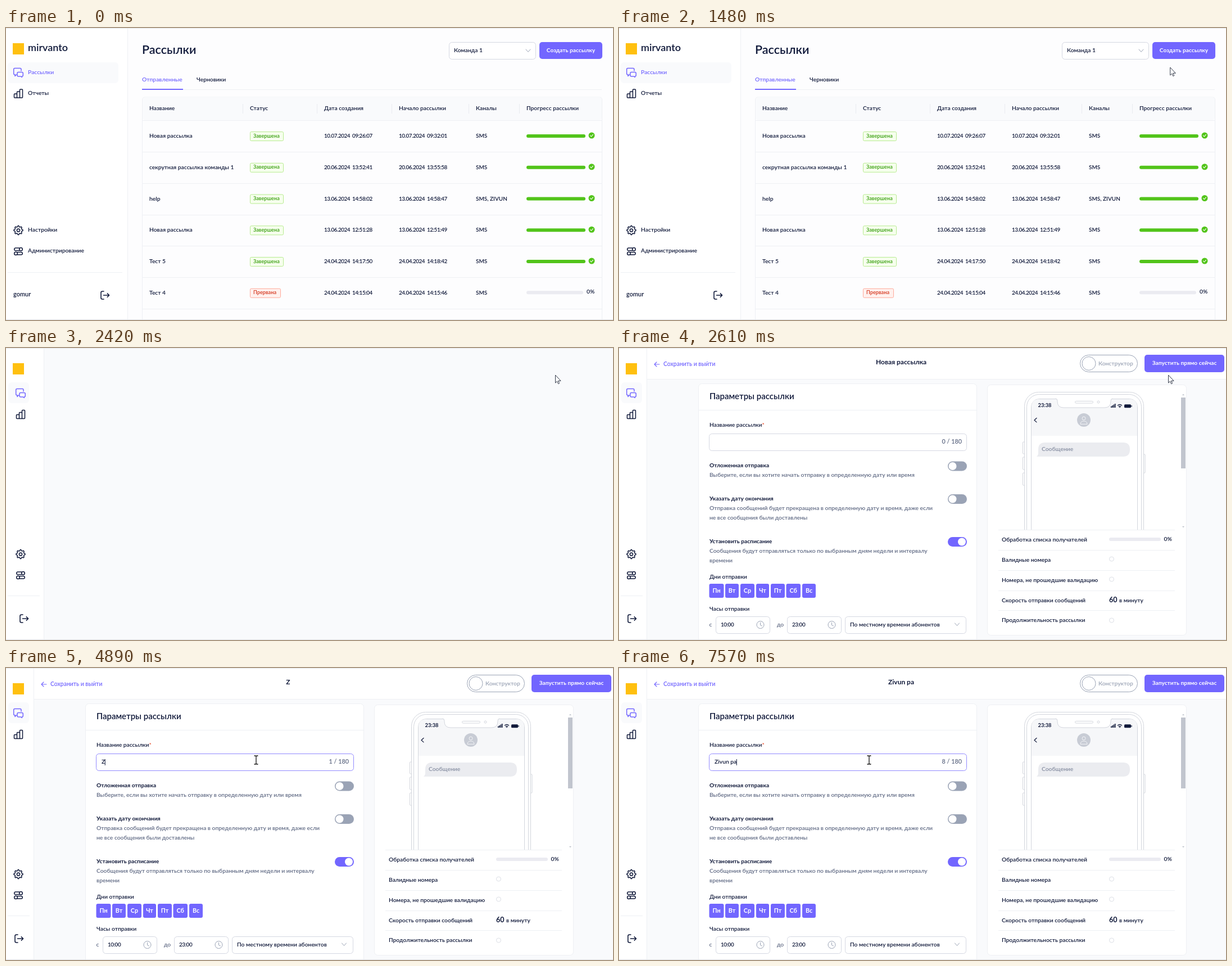
An HTML page for the animation above (8 s loop, 1080 px wide and 519 px high).

```html
<!DOCTYPE html>
<html lang="ru">
<head>
<meta charset="utf-8">
<title>Рассылки</title>
<style>
  html, body { margin: 0; width: 100%; height: 100%; overflow: hidden; background: #fff; }
  svg { display: block; width: 100%; height: 100%; }
  text { font-family: Lato, "Noto Sans", sans-serif; white-space: pre; }
</style>
</head>
<body>
<svg id="stage" viewBox="0 0 1080 519"></svg>
<script>
const LOOP = 8000;
const INK = '#10193a', GRAY = '#606a84', MUTED = '#9aa3b5', LINE = '#eef0f4', EDGE = '#d5d8e2';
const PURPLE = '#7266ff', HOVER = '#928aff', PALE = '#f9fafc', GREEN = '#52c41a', YELLOW = '#ffc010';

const text = (x, y, s, { size = 10.3, weight = 600, fill = INK, anchor = 'start', gap = 0, words = 0, id = '' } = {}) =>
  `<text id="${id}" x="${x}" y="${y}" font-size="${size}" font-weight="${weight}" fill="${fill}" text-anchor="${anchor}" letter-spacing="${gap}" word-spacing="${words}">${s}</text>`;
const rect = (x, y, w, h, fill, r = 0, stroke = 'none', extra = '') =>
  `<rect x="${x}" y="${y}" width="${w}" height="${h}" rx="${r}" fill="${fill}" stroke="${stroke}" ${extra}/>`;
const circle = (x, y, r, fill, stroke = 'none', width = 1, extra = '') =>
  `<circle cx="${x}" cy="${y}" r="${r}" fill="${fill}" stroke="${stroke}" stroke-width="${width}" ${extra}/>`;
const path = (d, stroke = INK, width = 1, fill = 'none') =>
  `<path d="${d}" stroke="${stroke}" stroke-width="${width}" fill="${fill}" stroke-linecap="round" stroke-linejoin="round"/>`;
const hline = (x, y, w, fill = LINE) => rect(x, y, w, 1, fill);
const vline = (x, y, h, fill = LINE) => rect(x, y, 1, h, fill);
const at = (x, y, body) => `<g transform="translate(${x} ${y})">${body}</g>`;
const chevron = (x, y) => path(`M${x - 4} ${y - 2}l4 4.5 4-4.5`, MUTED);
const DIGITS = { size: 9.9, gap: -0.45, words: 2 };

// Sidebar icons, each centred on its own origin
const gear = Array.from({ length: 32 }, (_, i) => {
  const r = i % 4 < 2 ? 8 : 6.2, a = (i - 0.5) * Math.PI / 16;
  return `${(r * Math.cos(a)).toFixed(2)} ${(r * Math.sin(a)).toFixed(2)}`;
}).join('L');
const icons = {
  chat: path('M-3.500 4h-.5l-2 2.500v-2.500q-2.300 0-2.300-2v-7.500q0-2 2-2h9.300q2 0 2 2v2.500M0-.5h6.300q2 0 2 2v3.500q0 2-2 2v1.500l-2-1.500h-4.300q-2 0-2-2v-3.500q0-2 2-2z', PURPLE, 1.5),
  bars: path('M-7.500 1.500q0-1 1-1h4v7h-4q-1 0-1-1zM-2.500 7.500v-10q0-1 1-1h3q1 0 1 1v10zM2.500 7.500v-14q0-1 1-1h3q1 0 1 1v13q0 1-1 1z', INK, 1.5),
  gear: path(`M${gear}Z`, INK, 1.5) + circle(0, 0, 2.6, 'none', INK, 1.5),
  sliders: path('M1.500-1.500h-6.500a2.300 2.300 0 0 1 0-4.600h6.500M-1.500 6.100h6.500a2.300 2.300 0 0 0 0-4.600h-6.500', INK, 1.5)
    + circle(4.5, -3.8, 2.8, 'none', INK, 1.5) + circle(-4.5, 3.8, 2.8, 'none', INK, 1.5),
  exit: path('M-2-7h-2.500q-2.500 0-2.500 2.500v9q0 2.500 2.500 2.500h2.500M-2.500 0h10M4.300-3.300l3.300 3.300-3.300 3.300', INK, 1.6)
};

const logo = rect(12, 27, 20, 20, YELLOW);
const button = (x, y, w, h, label, id) =>
  rect(x, y, w, h, PURPLE, 5, 'none', `id="${id}"`) +
  text(x + w / 2, y + h / 2 + 2.7, label, { size: 10.2, weight: 700, fill: '#fff', anchor: 'middle' });

function listScene() {
  const columns = [[255, 'Название'], [434, 'Статус'], [566, 'Дата создания'], [699, 'Начало рассылки'], [836, 'Каналы'], [926, 'Прогресс рассылки']];
  const rows = [
    ['Новая рассылка', '10.07.2024 09:26:07', '10.07.2024 09:32:01', 'SMS'],
    ['секрутная рассылка команды 1', '20.06.2024 13:52:41', '20.06.2024 13:55:58', 'SMS'],
    ['help', '13.06.2024 14:58:02', '13.06.2024 14:58:47', 'SMS, ZIVUN'],
    ['Новая рассылка', '13.06.2024 12:51:28', '13.06.2024 12:51:49', 'SMS'],
    ['Тест 5', '24.04.2024 14:17:50', '24.04.2024 14:18:42', 'SMS'],
    ['Тест 4', '24.04.2024 14:15:04', '24.04.2024 14:15:46', 'SMS']
  ];
  const tag = (y, label, w, fill, edge, ink) =>
    rect(434.5, y - 6.5, w, 16, fill, 2, edge) + text(440, y + 3.6, label, { size: 9.2, fill: ink });
  const row = ([name, created, started, channel], i) => {
    const y = 191 + 55.75 * i, base = y + 4;
    const done = i < 5;
    return hline(242, Math.round(y + 29), 818) + text(255, base, name) +
      text(566, base, created, DIGITS) + text(699, base, started, DIGITS) + text(836, base, channel, { size: 10 }) +
      (done
        ? tag(y, 'Завершена', 59, '#f6ffed', '#b7eb8f', '#389e0d') + rect(926, y - 2, 105, 6, GREEN, 3) +
          circle(1042, y, 5.5, GREEN) + path(`M1039.500 ${y}l1.800 2 3.200-3.600`, '#fff', 1.1)
        : tag(y, 'Прервана', 54, '#fff1ee', '#ffa99b', '#d4351c') + rect(926, y - 2.5, 101, 6, '#ebebf1', 3) +
          text(1033, y + 2.5, '0%'));
  };
  return rect(0, 0, 1080, 519, '#fdfdfe') + rect(0, 0, 216, 519, '#fff') + vline(216, 0, 519) +
    rect(3, 61, 197, 37, PALE, 6) + logo + text(39, 41, 'mirvanto', { size: 18 }) +
    at(22, 79, icons.chat) + text(39, 82, 'Рассылки', { fill: PURPLE }) +
    at(22, 116.5, icons.bars) + text(39, 119, 'Отчеты') +
    at(22, 359.5, icons.gear) + text(39, 362, 'Настройки') +
    at(22, 397, icons.sliders) + text(39, 399, 'Администрирование') +
    hline(3, 434, 204) + text(13, 477, 'gomur', { size: 11 }) + at(176, 475, icons.exit) +
    text(242, 46, 'Рассылки', { size: 21.5 }) +
    rect(788.5, 25.5, 154, 30, '#fff', 5, EDGE) + text(797, 43, 'Команда 1') + chevron(929, 40) +
    rect(949, 25, 112, 30, 'none', 5, PURPLE, 'id="wave"') + button(949, 25, 112, 30, 'Создать рассылку', 'create') +
    hline(242, 109, 818) + rect(242, 108, 73, 2, PURPLE) +
    text(242, 95, 'Отправленные', { fill: PURPLE }) + text(339, 95, 'Черновики') +
    path('M242.500 519v-391q0-5 5-5h808q5 0 5 5v391', LINE) + rect(243, 123, 817, 41, PALE, 5) + hline(242, 164, 818) +
    columns.map(([x, s], i) => text(x, 146, s) + (i ? vline(x - 13, 135, 17, '#e9ebf0') : '')).join('') +
    rows.map(row).join('');
}

function miniSidebar(width, x, exitX) {
  return rect(0, 0, width, 519, '#fff') + vline(width - 1, 0, 519) + rect(4, 61, 37, 37, PALE, 6) + logo +
    at(x, 80, icons.chat) + at(x, 118, icons.bars) + at(x, 366.5, icons.gear) + at(x, 404, icons.sliders) +
    hline(3, 440, width - 11) + at(exitX, 481, icons.exit);
}

function phone() {
  const edge = '#d3d6dd';
  const shell = (x, y, w, r) => rect(x, y, w, 300, '#fff', r, edge);
  const bump = (x, y, h) => rect(x, y, 3.5, h, '#fff', 1, edge);
  return `<clipPath id="cut"><rect x="700" y="70" width="290" height="254"/></clipPath><g clip-path="url(#cut)">` +
    bump(718.5, 167, 21) + bump(718.5, 194, 22) + bump(718.5, 222, 22) + bump(932.5, 189, 33) +
    shell(721.5, 78.5, 212, 25) + shell(725.5, 82.5, 204, 22) + shell(733.5, 90.5, 189, 14) +
    path('M734 156v-51q0-14 14-14h160q14 0 14 14v51z', 'none', 0, '#f6f7f9') +
    path('M777 90q3 0 3 4v1q0 11 11 11h73q11 0 11-11v-1q0-4 3-4', edge, 1, '#fff') +
    rect(811.5, 94.5, 32, 3.5, '#fff', 2, edge) + circle(853, 96, 2, '#fff', edge) +
    text(745.5, 105, '23:38', { size: 9.3, weight: 700 }) +
    [0, 1, 2, 3].map(i => rect(875 + i * 2.3, 103.5 - i * 1.5, 1.6, 2.5 + i * 1.5, INK)).join('') +
    path('M887.500 102q3.500-3 7 0M889.300 104q1.700-1.300 3.400 0', INK, 1.3) + circle(891, 105.3, 0.9, INK) +
    rect(899, 100.2, 12, 6, INK, 1.5) + rect(911.5, 102, 1.2, 2.5, INK) +
    path('M743 124.500l-4 3.700 4 3.700', INK, 1.2) +
    circle(827, 128, 12, '#c8ccd5') + circle(827, 125, 3, 'none', '#f2f3f6') + path('M821 135q0-5 6-5t6 5z', '#f2f3f6') +
    path('M743 193q3-2 3-7v-6q0-12 12-12h139q12 0 12 12v1q0 12-12 12z', 'none', 0, '#ebecf0') +
    text(752, 182.5, 'Сообщение', { fill: '#858da1' }) + '</g>';
}

function formScene() {
  const toggle = (y, on) => rect(585, y - 8.5, 34, 17, on ? PURPLE : MUTED, 8.5) + circle(on ? 610 : 593.5, y, 7, '#fff');
  const option = (y, title, lines) => text(161, y, title, { size: 10.2, weight: 700 }) +
    lines.map((s, i) => text(161, y + 17 + 17 * i, s, { fill: GRAY })).join('');
  const clock = x => circle(x, 492, 6.5, 'none', MUTED) + path(`M${x} 488v4.500l3 1.500`, MUTED);
  const field = (x, w, s, style) => rect(x + .5, 477.5, w, 30, '#fff', 5, EDGE) + text(x + 9, 495, s, style);
  const days = [['Пн', 160.5, 26], ['Вт', 189, 24], ['Ср', 216, 25], ['Чт', 244, 23], ['Пт', 270, 25], ['Сб', 297.5, 25.5], ['Вс', 326, 24]]
    .map(([d, x, w]) => rect(x, 419, w, 25, PURPLE, 3) +
      text(x + w / 2, 435, d, { fill: '#fff', anchor: 'middle', size: 10.8, weight: 700 })).join('');
  const stats = [[344, 'Обработка списка получателей'], [380, 'Валидные номера'], [416, 'Номера, не прошедшие валидацию'], [452, 'Скорость отправки сообщений'], [487, 'Продолжительность рассылки']]
    .map(([y, s]) => hline(675, y - 21, 314) + text(681, y, s)).join('');
  return rect(0, 0, 1080, 519, PALE) + rect(50, 0, 1030, 55, '#fff') + hline(50, 55, 1030) + miniSidebar(50, 22, 23) +
    path('M63 29h9M67 25l-4 4 4 4', PURPLE, 1.1) + text(79, 32, 'Сохранить и выйти', { fill: PURPLE, size: 10.4 }) +
    text(502, 29, '', { size: 12, weight: 700, anchor: 'middle', id: 'title' }) +
    rect(820.5, 12.5, 102, 30, '#fff', 15, MUTED) + circle(836, 27.5, 12, '#fff', MUTED) +
    text(853, 30.5, 'Конструктор', { fill: MUTED }) +
    button(935, 12, 142, 31, 'Запустить прямо сейчас', 'launch') +
    rect(141.5, 63.5, 495, 470, '#fff', 6, LINE) + text(161, 91, 'Параметры рассылки', { size: 15 }) + hline(142, 110, 495) +
    text(161, 140, 'Название рассылки<tspan fill="#e8502f">*</tspan>') +
    rect(160.5, 152.5, 458, 30, '#fff', 5, EDGE, 'id="input"') + text(170, 170, '', { id: 'name' }) +
    rect(169, 162, 1, 11, INK, 0, 'none', 'id="caret"') +
    text(610, 170, '', { size: 10.8, fill: GRAY, anchor: 'end', id: 'count' }) +
    option(212, 'Отложенная отправка', ['Выберите, если вы хотите начать отправку в определенную дату или время']) + toggle(210, false) +
    option(271, 'Указать дату окончания', ['Отправка сообщений будет прекращена в определенную дату и время, даже если', 'не все сообщения были доставлены']) + toggle(268.5, false) +
    option(347, 'Установить расписание', ['Сообщения будут отправляться только по выбранным дням недели и интервалу', 'времени']) + toggle(344.5, true) +
    text(161, 410, 'Дни отправки') + days + text(161, 467, 'Часы отправки') +
    text(160.5, 495, 'с', { fill: GRAY }) + field(172, 96, '10:00', DIGITS) + clock(251.5) +
    text(281, 495, 'до', { fill: GRAY }) + field(299, 96, '23:00', DIGITS) + clock(378.5) +
    field(402, 215, 'По местному времени абонентов') + chevron(601.5, 491) +
    rect(655.5, 65.5, 354, 445, '#fff', 6, LINE) + phone() +
    rect(1000, 88, 8, 126, '#c1c5ce') + path('M1002 84h4l-2-2z', 'none', 0, '#b5b9c3') + path('M1002 317h4l-2 2z', 'none', 0, '#b5b9c3') +
    stats + rect(872, 337, 92, 6, '#ebebf1', 3) + text(969.5, 342.5, '0%') +
    [375, 411, 484].map(y => circle(876.5, y, 4, 'none', '#dcdfe6')).join('') +
    text(872, 452, '60', { size: 12.5, weight: 700 }) + text(890, 452, 'в минуту');
}

const stage = document.getElementById('stage');
stage.innerHTML =
  `<g id="list">${listScene()}</g>` +
  `<g id="loading">${rect(0, 0, 1080, 519, PALE)}${miniSidebar(68, 26, 32)}</g>` +
  `<g id="form">${formScene()}</g>` + hline(0, 0, 1080, '#e6e8ec') + hline(0, 518, 1080, '#e2e4e8') +
  `<g id="arrow">${path('M.5.5v13.500l3-2.800 2.200 4.500 2-1-2.200-4.300h4.200z', '#333a4a', 1, '#fff')}</g>` +
  `<g id="beam">${path('M-3-7h2l1 1 1-1h2M0-6v13M-3 8h2l1-1 1 1h2', '#111', 1.3)}${circle(0, 0, 9, '#ffee00', 'none', 1, 'id="spot" opacity=".62"')}</g>`;

const $ = id => document.getElementById(id);
const show = (id, on) => $(id).setAttribute('visibility', on ? 'visible' : 'hidden');
const ease = p => p * p * (3 - 2 * p);

// Pointer way points: time, x, y
const track = [[70, 1010, 519], [210, 1004, 417], [310, 995, 355], [450, 978, 243], [600, 980, 175], [670, 982, 156],
  [860, 985, 130], [1300, 982, 88], [1600, 979, 58], [1800, 977, 48], [2740, 977, 48]];
const SETTLE = [445, 163];

function pointer(t) {
  if (t >= 2740) {
    const p = ease(Math.min(1, (t - 2740) / 480));
    return [977 + (SETTLE[0] - 977) * p, 48 + (SETTLE[1] - 48) * p];
  }
  const i = Math.max(1, track.findIndex(k => k[0] > t));
  const [a, b] = [track[i - 1], track[i]];
  const p = (t - a[0]) / (b[0] - a[0]);
  return [a[1] + (b[1] - a[1]) * p, a[2] + (b[2] - a[2]) * p];
}

const PHRASE = 'Zivun\u00a0ра';
const KEYS = [4890, 5300, 5930, 6030, 6240, 6640, 7440, 7570];
const FOCUS = 3360, BLINK = 530, CLICK = 2070;

function draw(t) {
  const scene = t < 2420 ? 'list' : t < 2610 ? 'loading' : 'form';
  for (const id of ['list', 'loading', 'form']) $(id).setAttribute('display', id === scene ? 'inline' : 'none');

  const [x, y] = pointer(t);
  const inField = scene === 'form' && y > 152 && x < 618;
  show('arrow', t >= 70 && !inField);
  show('beam', inField);
  show('spot', inField && t >= 3290 && t < 3500);
  $(inField ? 'beam' : 'arrow').setAttribute('transform', `translate(${x} ${y})`);

  $('create').setAttribute('fill', y < 55 ? HOVER : PURPLE);
  const p = Math.min(1, Math.max(0, (t - CLICK) / 350)), grow = 5 * ease(p);
  const wave = { x: 949 - grow / 2, y: 25 - grow / 2, width: 112 + grow, height: 30 + grow, 'stroke-width': grow, opacity: t < CLICK ? 0 : 0.25 * (1 - p) };
  for (const k in wave) $('wave').setAttribute(k, wave[k]);

  const typed = KEYS.filter(k => k <= t), value = PHRASE.slice(0, typed.length);
  $('name').textContent = value;
  $('title').textContent = value.trim() || 'Новая рассылка';
  $('count').textContent = `${value.length} / 180`;
  $('input').setAttribute('stroke', inField ? HOVER : EDGE);
  const since = t - (typed.length ? typed[typed.length - 1] : FOCUS);
  const caretOn = scene === 'form' && since >= 0 && Math.floor(since / BLINK) % 2 === 0;
  $('caret').setAttribute('display', caretOn ? 'inline' : 'none');
  if (caretOn) $('caret').setAttribute('x', 169.5 + (value ? $('name').getComputedTextLength() : 0));
}

const start = performance.now();
function tick() {
  draw((performance.now() - start) % LOOP);
  requestAnimationFrame(tick);
}
tick();
</script>
</body>
</html>
```
